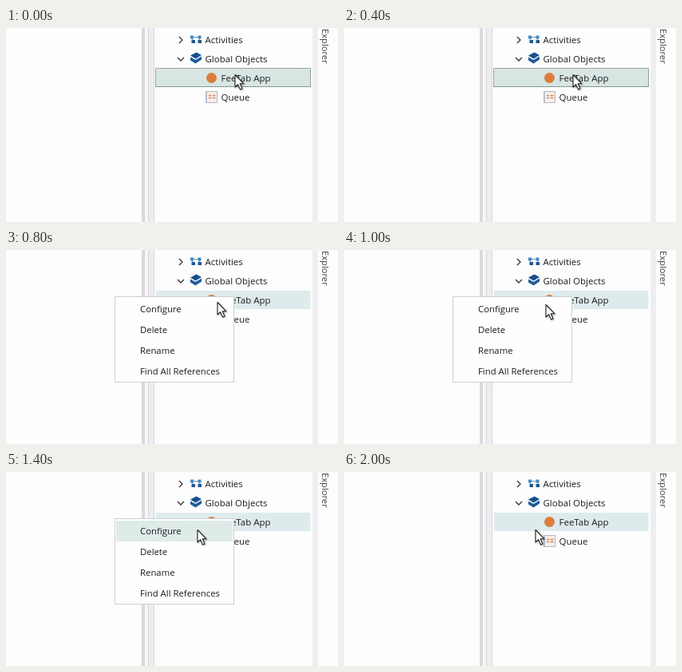
Write an HTML page that moves like this. It is 416x243 px and loops after 2200 ms.

```html
<!DOCTYPE html>
<html lang="en">
<head>
<meta charset="utf-8">
<title>Context menu</title>
<style>
html, body { margin: 0; width: 100%; height: 100%; overflow: hidden; background: #fdfdfd; }
svg { display: block; width: 100vw; height: 100vh; }
text { font: 11.5px "Open Sans", "Noto Sans", sans-serif; fill: #1c1d20; }
#menu text { font-size: 11.35px; }
#cursor { filter: drop-shadow(1px 1px 1px #0005); }
</style>
</head>
<body>
<svg viewBox="0 0 416 243">
  <rect width="416" height="243" fill="#fdfdfd"/>

  <!-- Panel edges -->
  <rect x="170" width="4" height="243" fill="#d9d9dc"/>
  <rect x="174" width="4" height="243" fill="#f7f7f8"/>
  <rect x="178" width="8" height="243" fill="#ededf0"/>
  <rect x="178" width="1" height="243" fill="#d6d6da"/>
  <rect x="185" width="1" height="243" fill="#d6d7dc"/>
  <rect x="384" width="7" height="243" fill="#eeeef1"/>
  <text transform="translate(395.5 1) rotate(90)" style="font-size:11.2px;fill:#404046">Explorer</text>

  <!-- Tree -->
  <rect id="selection" x="188" y="51" width="193.5" height="23"/>
  <rect id="focus" x="187.5" y="50.5" width="194" height="23" fill="none" stroke="#3b4745" stroke-dasharray="1" stroke-dashoffset=".5"/>
  <path d="M217 11l4 4-4 4M215 37l4 4 4-4" fill="none" stroke="#333" stroke-width="1.300"/>
  <path d="M233.500 12v4M242.500 12v4M235 11.500h6" fill="none" stroke="#6d9cc6"/>
  <path d="M231 9.500h4v4h-4zM240.500 9.500h4v4h-4z" fill="#4687bd"/>
  <path d="M232.500 15h4.500v4h-4.500zM240.500 15h4.500v4h-4.500z" fill="#24588f"/>
  <path d="M231 34.500l7.500-4 6.500 3.500-7.500 4.500z" fill="#174f8c"/>
  <path d="M231 36.500l6.500 3.500 7.500-4.500v4l-7.500 5-6.500-4z" fill="#1f5b9a"/>
  <circle cx="257.500" cy="62.500" r="6.500" fill="#dc7d3d"/>
  <rect x="250.500" y="79.500" width="14" height="14" fill="#f9eee8" stroke="#b3b8c0"/>
  <path d="M251.500 80v13" stroke="#b9cbe0"/>
  <path d="M254 84.500h3m1.500 0h4M254 87.500h3m1.500 0h4" stroke="#d08a6e" stroke-width="1.300"/>
  <text x="249.500" y="19">Activities</text>
  <text x="249.500" y="43">Global Objects</text>
  <text x="269.500" y="67">FeeTab App</text>
  <text x="269.500" y="91">Queue</text>

  <g id="menu">
    <rect x="136.500" y="58.500" width="149" height="107" fill="#fefefe" stroke="#cfd0d2"/>
    <rect id="hover" x="138" y="61" width="146" height="26" fill="#deebe9"/>
    <text x="168" y="78">Configure</text>
    <text x="168" y="104">Delete</text>
    <text x="168" y="130">Rename</text>
    <text x="168" y="156">Find All References</text>
  </g>

  <path id="cursor" d="M0 0V15.500L3.600 12.200 6.500 18.600 9 17.500 6.200 11.300H11Z" fill="#fff" stroke="#222" stroke-width="1.100" stroke-linejoin="round"/>
</svg>
<script>
const LOOP = 2200, STEP = 200;
const [selection, focus, menu, hover, cursor] =
  ["selection", "focus", "menu", "hover", "cursor"].map(id => document.getElementById(id));

// Pointer stops: [start time, x, y]
const stops = [[0, 287, 58.5], [800, 265, 65.5], [1000, 253, 68.5], [1200, 240, 72.5]];

const show = (node, on) => node.setAttribute("visibility", on ? "visible" : "hidden");

function draw(now) {
  const time = Math.floor((now % LOOP) / STEP) * STEP;
  const open = time >= 600 && time < 1600;
  const focused = time < 600;
  selection.setAttribute("fill", focused ? "#d8e6e3" : "#deebec");
  show(focus, focused);
  show(menu, open);
  show(hover, open && time >= 1200);
  const [, x, y] = stops.findLast(stop => stop[0] <= time);
  cursor.setAttribute("transform", `translate(${x} ${y})`);
}

const start = performance.now();
function tick() {
  draw(performance.now() - start);
  requestAnimationFrame(tick);
}
tick();
</script>
</body>
</html>
```
